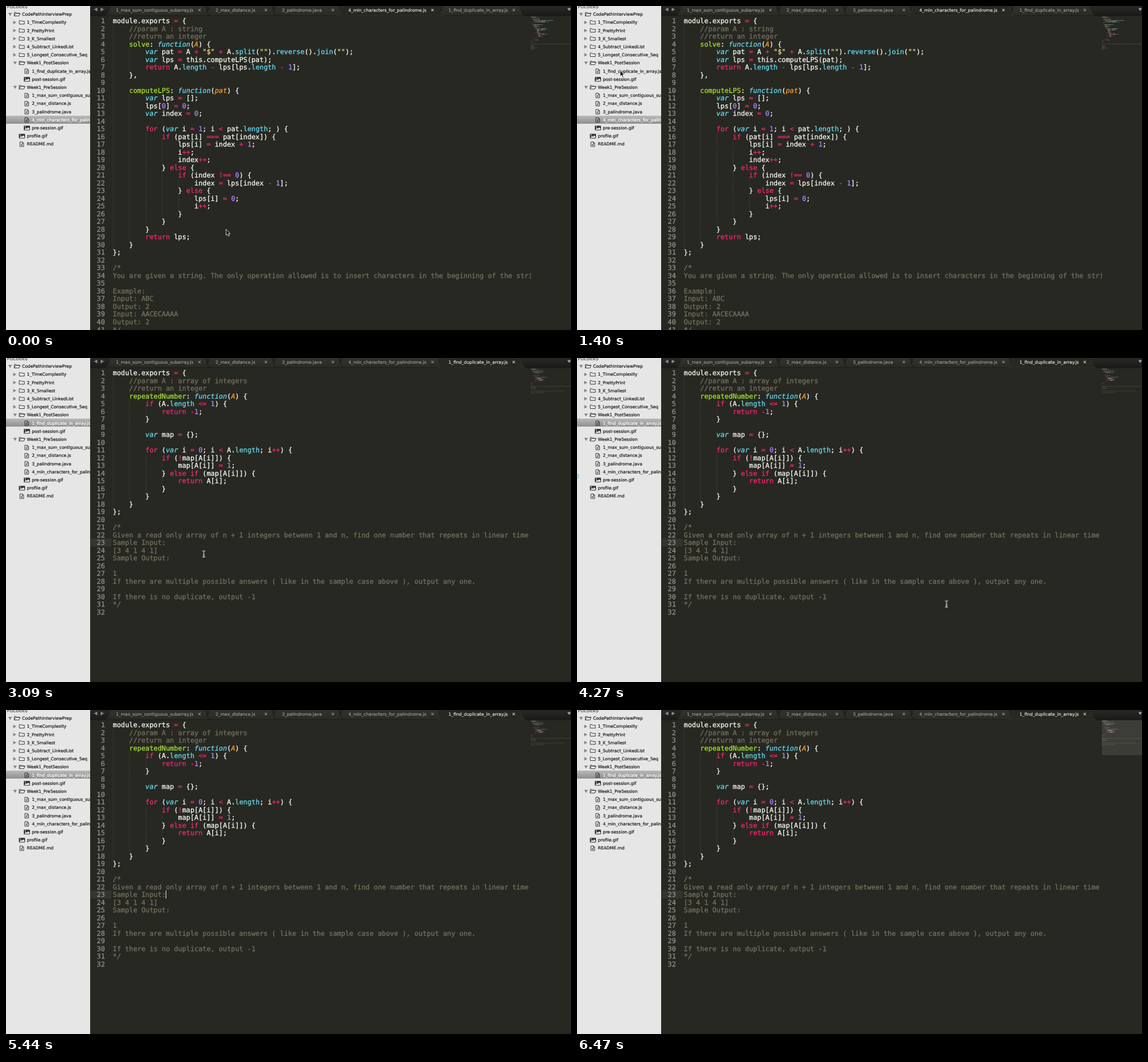
Animation, 987 px wide and 567 px high, one loop 6560 ms. Source, as an HTML page:

```html
<!DOCTYPE html>
<html lang="en">
<head>
<meta charset="utf-8">
<title>Code editor</title>
<style>
html, body { margin: 0; width: 100%; height: 100%; overflow: hidden; background: #272822; }
svg { display: block; position: absolute; left: 0; top: 0; }
text { white-space: pre; text-rendering: geometricPrecision; }
text, tspan { fill: currentColor; stroke: currentColor; stroke-width: .3px; }
.code { font: 11.84px "DejaVu Sans Mono", "Liberation Mono", monospace; color: #f8f8f2; }
.code .c { color: #75715e; }
.code .s { color: #e6db74; }
.code .t { color: #66d9ef; font-style: italic; }
.code .k { color: #f92672; }
.code .n { color: #ae81ff; }
.code .f { color: #66d9ef; }
.code .e { color: #a6e22e; }
.code .p { color: #fd971f; font-style: italic; }
.num { color: #8f908a; text-anchor: end; }
.side { font: 7.48px "DejaVu Sans", Verdana, sans-serif; color: #111; stroke-width: .18px; }
.side.on { color: #fff; }
.side.head { color: #747a82; font-size: 7px; font-weight: bold; }
.tab { font: 7.6px "DejaVu Sans", Verdana, sans-serif; color: #a3a49f; stroke-width: .12px; }
.tab.on { color: #f8f8f4; }
</style>
</head>
<body>
<svg id="stage" width="987" height="567" viewBox="0 0 987 567">
  <defs>
    <linearGradient id="sel" x2="0" y2="1"><stop stop-color="#b9b9b9"/><stop offset="1" stop-color="#8f8f8f"/></linearGradient>
    <linearGradient id="bar" x2="0" y2="1"><stop stop-color="#282925"/><stop offset="1" stop-color="#1a1b18"/></linearGradient>
    <linearGradient id="idle" x2="0" y2="1"><stop stop-color="#32332e"/><stop offset="1" stop-color="#292a25"/></linearGradient>
  </defs>
</svg>
<script>
const LOOP = 6560, ADV = 7.128, LINE = 13.51, LEFT = 186.6, TOP = 18.9, ROW = 14.2, EDGE = 147;
const stage = document.getElementById('stage');

function el(tag, attrs, parent = stage, text) {
  const e = document.createElementNS('http://www.w3.org/2000/svg', tag);
  for (const k in attrs) e.setAttribute(k, attrs[k]);
  if (text !== undefined) e.textContent = text;
  return parent.appendChild(e);
}
const group = (attrs, parent) => el('g', attrs, parent);
const rect = (x, y, width, height, fill, parent, more) => el('rect', { x, y, width, height, fill, ...more }, parent);
const line = (d, stroke, parent, width = 1) => el('path', { d, stroke, fill: 'none', 'stroke-width': width }, parent);
const fill = (d, color, parent) => el('path', { d, fill: color }, parent);

const files = [`module.exports = {
    //param A : string
    //return an integer
    solve: function(A) {
        var pat = A + "$" + A.split("").reverse().join("");
        var lps = this.computeLPS(pat);
        return A.length - lps[lps.length - 1];
    },

    computeLPS: function(pat) {
        var lps = [];
        lps[0] = 0;
        var index = 0;

        for (var i = 1; i < pat.length; ) {
            if (pat[i] === pat[index]) {
                lps[i] = index + 1;
                i++;
                index++;
            } else {
                if (index !== 0) {
                    index = lps[index - 1];
                } else {
                    lps[i] = 0;
                    i++;
                }
            }
        }
        return lps;
    }
};

/*
You are given a string. The only operation allowed is to insert characters in the beginning of the string.

Example:
Input: ABC
Output: 2
Input: AACECAAAA
Output: 2
*/`, `module.exports = {
    //param A : array of integers
    //return an integer
    repeatedNumber: function(A) {
        if (A.length <= 1) {
            return -1;
        }

        var map = {};

        for (var i = 0; i < A.length; i++) {
            if (!map[A[i]]) {
                map[A[i]] = 1;
            } else if (map[A[i]]) {
                return A[i];
            }
        }
    }
};

/*
Given a read only array of n + 1 integers between 1 and n, find one number that repeats in linear time using
Sample Input:
[3 4 1 4 1]
Sample Output:

1
If there are multiple possible answers ( like in the sample case above ), output any one.

If there is no duplicate, output -1
*/
`].map(s => s.split('\n'));

const SYNTAX = /(?<c>\/\/.*)|(?<s>"[^"]*")|(?<p>(?<=function\()\w+)|(?<e>\w+(?=: function))|(?<t>\b(?:var|function)\b)|(?<k>\b(?:if|else|for|return)\b|[-+=<!]+)|(?<n>\b\d+\b)|(?<f>\b(?:length|split|reverse|join)\b)/g;
const COLORS = { c: '#75715e', s: '#e6db74', p: '#fd971f', e: '#a6e22e', t: '#66d9ef', k: '#f92672', n: '#ae81ff', f: '#66d9ef' };

// Splits lines into [class, text] pieces, block comments included.
function tokens(lines) {
  let block = false;
  return lines.map(s => {
    if (s === '/*') block = true;
    if (block) {
      if (s === '*/') block = false;
      return [['c', s]];
    }
    const out = [];
    let at = 0;
    for (const m of s.matchAll(SYNTAX)) {
      if (m.index > at) out.push(['', s.slice(at, m.index)]);
      out.push([Object.keys(m.groups).find(k => m.groups[k] !== undefined), m[0]]);
      at = m.index + m[0].length;
    }
    out.push(['', s.slice(at)]);
    return out;
  });
}

function drawCode(lines, parent) {
  const g = group({ class: 'code' }, parent);
  const indent = i => {
    while (i < lines.length && !lines[i]) i++;
    return i < lines.length ? lines[i].search(/\S/) / 4 : 0;
  };
  tokens(lines).forEach((parts, i) => {
    const y = TOP + i * LINE;
    for (let k = 0; k < indent(i); k++) {
      const x = Math.round(LEFT + k * 4 * ADV) + .5;
      el('path', { d: `M${x} ${y}v${LINE}`, stroke: '#45463f', 'stroke-dasharray': '1 1' }, g);
    }
    el('text', { x: 172.8, y: y + 11.2, class: 'num' }, g, i + 1);
    const t = el('text', { x: LEFT, y: y + 11.2 }, g);
    for (const [cls, s] of parts) if (s) el('tspan', { class: cls }, t, s);
  });
}

function drawMap(lines, parent) {
  tokens(lines).forEach((parts, i) => {
    let col = 0;
    for (const [cls, s] of parts) {
      for (const m of s.matchAll(/\S+/g))
        rect(917 + (col + m.index) * .66, 19.2 + i * 1.42, m[0].length * .66, .85, COLORS[cls] || '#f8f8f2', parent, { opacity: .5 });
      col += s.length;
    }
  });
}

// Sidebar: [level, icon, name]
const tree = [
  [0, 'open', 'CodePathInterviewPrep'], [1, 'shut', '1_TimeComplexity'], [1, 'shut', '2_PrettyPrint'],
  [1, 'shut', '3_K_Smallest'], [1, 'shut', '4_Subtract_LinkedList'], [1, 'shut', '5_Longest_Consecutive_Seq'],
  [1, 'open', 'Week1_PostSession'], [2, 'file', '1_find_duplicate_in_array.js'], [2, 'pic', 'post-session.gif'],
  [1, 'open', 'Week1_PreSession'], [2, 'file', '1_max_sum_contiguous_subarray.js'], [2, 'file', '2_max_distance.js'],
  [2, 'file', '3_palindrome.java'], [2, 'file', '4_min_characters_for_palindrome.js'], [2, 'pic', 'pre-session.gif'],
  [1, 'pic', 'profile.gif'], [1, 'file', 'README.md']
];

function drawRow(i, parent, selected) {
  const [level, icon, name] = tree[i];
  const x = 28 + level * 8.6, y = 14.5 + i * ROW;
  if (selected) rect(0, Math.round(y - 7.6), EDGE, 14, 'url(#sel)', parent);
  const ink = '#2b2b2b';
  if (icon === 'open') {
    fill(`M${x - 24} ${y - 2.5}h6.4l-3.2 5.4z`, '#858585', parent);
    line(`M${x - 13.5} ${y + 3}v-6.2h3l1 1.2h4.6v1.6M${x - 13.5} ${y + 3}l2-4.6h8.2l-2 4.6z`, ink, parent, .9);
  } else if (icon === 'shut') {
    fill(`M${x - 24} ${y - 3.2}v6.4l5.4-3.2z`, '#858585', parent);
    line(`M${x - 13.5} ${y + 3}v-6.2h3l1 1.2h5v5z`, ink, parent, .9);
  } else if (icon === 'file') {
    line(`M${x - 12.3} ${y - 3.8}h4.4l2.2 2.2v5.8h-6.6zM${x - 8} ${y - 3.8}v2.4h2.3M${x - 10.6} ${y + .3}h3.2M${x - 10.6} ${y + 2.1}h3.2`, ink, parent, .9);
  } else {
    rect(x - 14, y - 3.8, 10.6, 8, ink, parent, { rx: .8 });
    fill(`M${x - 13} ${y + 3.2}l2.6-3.6 1.8 1.8 2.2-2.8 2 2.6v2z`, '#eee', parent);
    el('circle', { cx: x - 11.4, cy: y - 1.8, r: .9, fill: '#eee' }, parent);
  }
  el('text', { x, y: y + 2.7, class: selected ? 'side on' : 'side' }, parent, name);
}

const tabs = [
  [192, 338, '1_max_sum_contiguous_subarray.js'], [366, 454, '2_max_distance.js'], [482, 571, '3_palindrome.java'],
  [598, 745, '4_min_characters_for_palindrome.js'], [773, 887, '1_find_duplicate_in_array.js']
];

function drawTabs(active, parent) {
  rect(EDGE, 0, 840, 18, 'url(#bar)', parent);
  const shape = ([x, close, name], on) => {
    const l = x - 20, r = close + 20;
    el('path', {
      d: `M${l} 17.5C${l + 6} 17 ${l + 8} 3 ${l + 11} -1H${r - 11}C${r - 8} 3 ${r - 6} 17 ${r} 17.5Z`,
      fill: on ? '#272822' : 'url(#idle)', stroke: on ? '#3a3b35' : '#191a16', 'stroke-width': .8
    }, parent);
    el('text', { x, y: 9.8, class: on ? 'tab on' : 'tab' }, parent, name);
    line(`M${close - 2} 5.2l4 4m0-4l-4 4`, on ? '#c8c8c4' : '#8d8e89', parent, 1.1);
  };
  tabs.slice().reverse().forEach(t => shape(t, false));
  rect(EDGE, 16.6, 840, 1, '#191a17', parent);
  shape(tabs[active], true);
  rect(EDGE, 17.6, 840, 1, '#272822', parent);
  fill('M159.5 2.8v6.6l-5.6-3.3zM165.5 2.8v6.6l5.6-3.3z', '#8b8c87', parent);
  fill('M980.5 3.8h6.5l-3.2 5z', '#a0a19c', parent);
}

// Sidebar
rect(0, 0, EDGE, 567, '#e6e6e6');
el('text', { x: 1.5, y: 3.6, class: 'side head' }, stage, 'FOLDERS');
tree.forEach((_, i) => drawRow(i, stage));
drawRow(13, group({ id: 'pick1' }), true);
drawRow(7, group({ id: 'pick2' }), true);
line('M0 203.2a4 4 0 0 1 0 7.6', '#6cc8ee', group({ id: 'blip', opacity: 0 }), 1.3);

// Editor
rect(EDGE, 0, 840, 567, '#272822');
[3, 4].forEach((tab, i) => {
  const page = group({ id: 'page' + (i + 1) });
  if (i) rect(148, 316, 36, 14, '#34352e', page);
  drawCode(files[i], page);
  const map = group({ id: 'map' + (i + 1) }, page);
  rect(917, 18, 80, 549, '#272822', map);
  drawMap(files[i], map);
  drawTabs(tab, page);
});
rect(917, 18, 70, 61, '#fff', group({ id: 'view', opacity: 0 }), { opacity: .1 });
rect(279, 316, 1, 14, '#f8f8f0', group({ id: 'caret', opacity: 0 }));

// Pointer
const mouse = group({ id: 'mouse' });
el('path', {
  d: 'M.4 .6V11.2L2.8 9L4.4 12.8L6.2 12L4.6 8.4H7.6Z', fill: '#111', stroke: '#fff', 'stroke-width': .8
}, group({ id: 'arrow' }, mouse));
line('M-2.5 -5.5q2.5 0 2.5 1.6v7.8q0 1.6 -2.5 1.6M2.5 -5.5q-2.5 0 -2.5 1.6v7.8q0 1.6 2.5 1.6M-1.4 1.8h2.8', '#f2f2ee', group({ id: 'beam', opacity: 0 }, mouse), 1.1);

// Held keyframes from [ms, value] steps.
let css = '';
function track(id, prop, steps) {
  const frames = steps.map(([t, v]) => `${Math.max(0, t - 1) / LOOP * 100}%{${prop}:${v}}`).join('');
  css += `@keyframes ${id}{${frames}}#${id}{animation:${id} ${LOOP}ms step-end infinite}`;
}
const shift = (x, y) => `translate(${x}px,${y}px)`;

for (const id of ['pick', 'page']) {
  track(id + 1, 'visibility', [[0, 'visible'], [2430, 'hidden']]);
  track(id + 2, 'visibility', [[0, 'hidden'], [2430, 'visible']]);
}
track('map2', 'transform', [[0, shift(9, 0)], [2710, shift(0, 0)]]);
track('view', 'opacity', [[0, 0], [5590, .35], [5735, .7], [5880, 1]]);
track('blip', 'opacity', [[0, 0], [4270, 1], [4420, 0], [6180, 1], [6330, 0]]);
track('caret', 'opacity', [[0, 0], [2430, 1], [2900, 0], [3390, .5], [3540, 1], [3980, 0], [4420, 1], [5000, 0], [5440, 1], [6180, .5], [6330, .2], [6470, 0]]);
track('arrow', 'opacity', [[0, 1], [2900, 0], [5000, 1], [5150, 0]]);
track('beam', 'opacity', [[0, 0], [2900, 1], [5000, 0]]);
track('mouse', 'transform', [
  [0, 384, 390], [150, 404, 394], [308, 415, 396], [467, 345, 340], [625, 222, 240], [783, 112, 152],
  [942, 61, 120], [1100, 75, 113], [1400, 75, 112], [2710, 130, 160], [2900, 300, 305], [3090, 345.5, 343],
  [3830, 362, 350], [3980, 450, 378], [4120, 560, 408], [4270, 645.5, 430.5], [4420, 722, 462],
  [4560, 800, 505], [4710, 858, 542], [4850, 882, 562], [5000, 937, 24]
].map(([t, x, y]) => [t, shift(x, y)]));

document.head.appendChild(document.createElement('style')).textContent = css;
</script>
</body>
</html>
```
